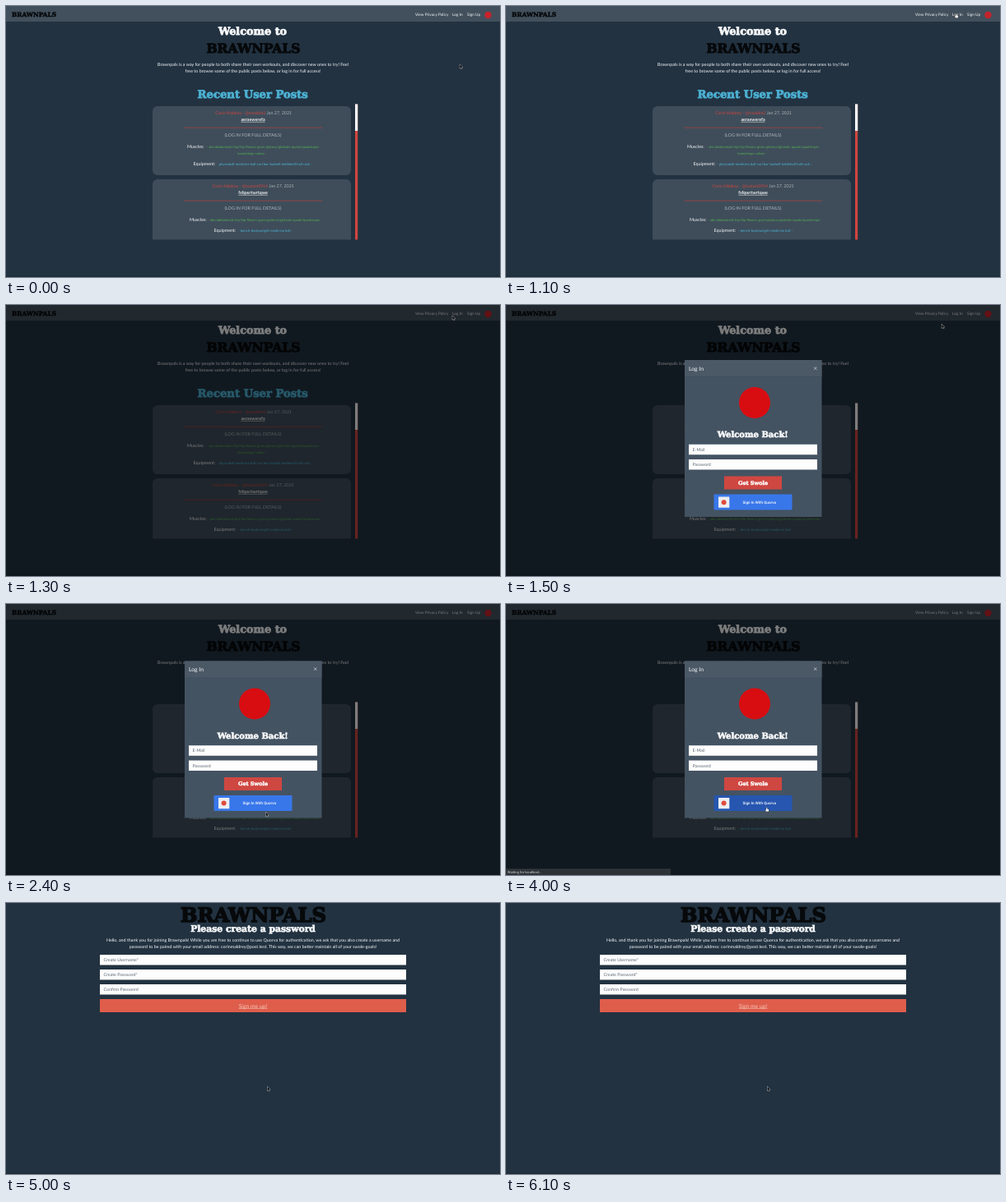
An HTML page with a canvas for the animation above (6300 ms loop, 600x330 px).

```html
<!DOCTYPE html>
<html lang="en">
<head>
<meta charset="utf-8">
<title>Brawnpals sign-in</title>
<style>
html, body { margin: 0; width: 100%; height: 100%; overflow: hidden; background: #223241; }
canvas { display: block; width: 600px; height: 330px; }
</style>
</head>
<body>
<canvas id="stage" width="600" height="330"></canvas>
<script>
const ctx = document.getElementById('stage').getContext('2d');
ctx.textRendering = 'geometricPrecision';

const LOOP = 6300, STEP = 100;
const LATO = 'Lato, sans-serif', ROBOTO = 'Roboto, sans-serif', SLAB = '"DejaVu Serif", serif';
const RED = '#d0453f', WHITE = '#f8f9fa', BG = '#223241', INK = '#07090b';

const clamp01 = v => Math.max(0, Math.min(1, v));
const mix = (a, b, k) => a + (b - a) * k;
const smooth = k => k * k * (3 - 2 * k);

function box(x, y, w, h, color, radius = 0) {
  ctx.fillStyle = color;
  ctx.beginPath();
  ctx.roundRect(x, y, w, h, radius);
  ctx.fill();
}

function disc(x, y, r, color) {
  ctx.fillStyle = color;
  ctx.beginPath();
  ctx.arc(x, y, r, 0, Math.PI * 2);
  ctx.fill();
}

function text(str, x, y, size, color, { align = 'left', weight = 400, font = LATO, underline = false } = {}) {
  ctx.font = `${weight} ${size}px ${font}`;
  ctx.textAlign = align;
  ctx.fillStyle = color;
  ctx.fillText(str, x, y);
  if (underline) {
    const w = ctx.measureText(str).width;
    ctx.fillRect(align === 'center' ? x - w / 2 : x, y + 0.6, w, 0.5);
  }
}

const centered = (str, x, y, size, color, options) =>
  text(str, x, y, size, color, { align: 'center', ...options });

// Heavy slab headings, thickened with a fine outline.
function heading(str, x, y, size, color, align = 'center') {
  text(str, x, y, size, color, { align, weight: 700, font: SLAB });
  ctx.strokeStyle = color;
  ctx.lineWidth = size * 0.06;
  ctx.lineJoin = 'miter';
  ctx.miterLimit = 2;
  ctx.strokeText(str, x, y);
}

function field(x, y, w, label) {
  box(x, y, w, 12.5, '#fdfdfd');
  text(label, x + 4.5, y + 8.1, 5.3, '#5f6a74');
}

function backdropPage() {
  box(0, 0, 600, 330, BG);
  box(0, 328.5, 600, 1.5, '#1e2c39');
}

const posts = [
  {
    y: 122, h: 84, author: 'Corin Maldrey - @cmaldre2', authorEnd: 315.3, title: 'aeraewerefa',
    labelX: 220, muscleX: 243.5, equipX: 227.5, gearX: 256,
    muscles: ['- abs/abdominals-hip/hip flexors-groin-gluteus/gluteals-quads/quadriceps-', 'hamstrings-calves -'],
    gear: '- physioball-medicine ball-curl bar-barbell-kettlebell-half rack -'
  },
  {
    y: 211, h: 84, author: 'Corin Maldrey - @tovlam0914', authorEnd: 318, title: 'fsfqwrtwrtqwe',
    labelX: 223, muscleX: 245, equipX: 252.5, gearX: 282,
    muscles: ['- abs/abdominals-hip/hip flexors-groin-gluteus/gluteals-quads/quadriceps-'],
    gear: '- bench-bodyweight-medicine ball -'
  }
];

function post(p) {
  const y = p.y;
  box(178, y, 241, p.h, '#3f4d5a', 6);
  text(p.author, p.authorEnd, y + 10.3, 5.1, RED, { align: 'right' });
  text('Jan 27, 2021', p.authorEnd + 1.3, y + 10.3, 5.4, '#a8b0b7');
  centered(p.title, 300, y + 18.3, 5.3, WHITE, { weight: 700, underline: true });
  box(216, y + 25.8, 168, 0.6, '#a8423f');
  centered('(LOG IN FOR FULL DETAILS)', 300, y + 37.3, 5.4, '#b0b8bf');
  text('Muscles:', p.labelX, y + 51, 5.4, WHITE);
  text(p.muscles[0], p.muscleX, y + 50.6, 4.22, '#52ae55');
  if (p.muscles[1]) centered(p.muscles[1], 299, y + 58.8, 4.22, '#52ae55');
  const last = y + (p.muscles[1] ? 72.4 : 64.4);
  text('Equipment:', p.equipX, last, 5.4, WHITE);
  text(p.gear, p.gearX, last - 0.3, 4.25, '#4bb2d4');
}

function homePage() {
  backdropPage();
  box(0, 0, 600, 19, '#42505d');
  heading('BRAWNPALS', 7, 13.3, 7.4, INK, 'left');
  text('View Privacy Policy', 497, 11.7, 4.75, WHITE);
  text('Log In', 542, 11.7, 4.75, WHITE);
  text('Sign Up', 560, 11.7, 4.75, WHITE);
  disc(585.5, 11, 4.2, '#c5232b');

  heading('Welcome to', 299.5, 35.2, 12.8, WHITE);
  heading('BRAWNPALS', 300.5, 57, 15.6, INK);
  centered('Brawnpals is a way for people to both share their own workouts, and discover new ones to try! Feel', 300, 72.9, 5.36, WHITE);
  centered('free to browse some of the public posts below, or log in for full access!', 300, 80.9, 5.36, WHITE);
  heading('Recent User Posts', 299.7, 112.3, 13.2, '#4cb1d3');

  ctx.save();
  ctx.beginPath();
  ctx.rect(170, 119.5, 260, 165);
  ctx.clip();
  posts.forEach(post);
  ctx.restore();
  box(424, 119.5, 3.2, 165, RED);
  box(424, 119.5, 3.2, 32.5, '#fbfbfb');
}

function loginDialog(hovered) {
  box(217, 69.5, 166.5, 191, '#445362');
  box(217, 69.5, 166.5, 20.5, '#4b5866');
  box(217, 89.8, 166.5, 0.5, '#3d4a58');
  text('Log In', 222, 82.3, 6.8, WHITE);
  centered('×', 375.6, 82, 8.5, '#c4cad0');
  disc(302, 121.5, 19, '#d80d12');
  heading('Welcome Back!', 299.7, 163.6, 10, WHITE);
  field(222, 172.3, 156, 'E-Mail');
  field(222, 190.4, 156, 'Password');
  box(265, 211, 70, 16, '#cf4741');
  heading('Get Swole', 300, 221.2, 6.5, '#ffffff');
  box(252.5, 233, 95, 19, hovered ? '#2656b0' : '#3877ea', 1);
  box(258, 236, 13.3, 13.3, '#eceef0', 0.5);
  disc(264.6, 242.6, 3, '#df4b3c');
  centered('Sign In With Quorva', 307.7, 244.1, 4.6, '#ffffff', { weight: 500, font: ROBOTO });
}

function passwordPage() {
  backdropPage();
  heading('BRAWNPALS', 300.5, 22.6, 24.2, INK);
  heading('Please create a password', 300, 35, 10.8, WHITE);
  centered('Hello, and thank you for joining Brawnpals! While you are free to continue to use Quorva for authentication, we ask that you also create a username and', 300, 46.9, 5.36, WHITE);
  centered('password to be paired with your email address: corinmaldrey@post.test. This way, we can better maintain all of your swole-goals!', 300, 55.1, 5.36, WHITE);
  field(114, 63, 372, 'Create Username*');
  field(114, 81, 372, 'Create Password*');
  field(114, 99, 372, 'Confirm Password');
  box(114, 117, 372, 16, '#df5d4b');
  centered('Sign me up!', 300, 127.9, 6.8, '#f3c8b8', { underline: true });
}

function statusBar() {
  box(0, 322.8, 200, 7.2, '#2d3237');
  box(0, 322.8, 200, 0.5, '#41474d');
  text('Waiting for localhost…', 1.8, 327.9, 4.2, '#d6d8da', { font: ROBOTO });
}

// Pointer stops: time, x, y of the tip.
const stops = [
  [0, 551.3, 71], [100, 551.3, 71], [700, 546.8, 9.4], [1200, 546.8, 9.4],
  [1500, 529.3, 23.2], [2100, 330, 238], [2400, 315.6, 253.5], [2700, 316.8, 247.8],
  [4300, 316.8, 247.8], [4800, 317.5, 223.5], [LOOP, 317.5, 223.5]
];

function pointerAt(t) {
  const i = Math.max(1, stops.findIndex(s => s[0] > t));
  const [t0, x0, y0] = stops[i - 1], [t1, x1, y1] = stops[i];
  const k = smooth((t - t0) / (t1 - t0));
  return [mix(x0, x1, k), mix(y0, y1, k)];
}

function pointer(x, y, hand) {
  ctx.save();
  ctx.translate(x, y);
  ctx.lineJoin = 'round';
  ctx.beginPath();
  if (hand) {
    ctx.roundRect(-0.6, 0, 1.2, 4, 0.5);
    ctx.roundRect(-1.4, 2, 3.8, 3, 0.8);
    ctx.fillStyle = '#f4f4f4';
    ctx.strokeStyle = '#16191c';
  } else {
    [[0, 0], [0, 5], [1.1, 4.1], [1.9, 5.6], [2.6, 5.2], [1.9, 3.7], [3.3, 3.6]]
      .forEach(([px, py]) => ctx.lineTo(px, py));
    ctx.closePath();
    ctx.fillStyle = '#101214';
    ctx.strokeStyle = '#e4e6e8';
  }
  ctx.lineWidth = 0.7;
  ctx.stroke();
  ctx.fill();
  ctx.restore();
}

function draw(t) {
  const overButton = t >= 2600;
  if (t < 4100) {
    homePage();
    const shade = 0.5 * clamp01((t - 1125) / 150);
    if (shade) box(0, 0, 600, 330, `rgba(0,0,0,${shade})`);
    const slide = clamp01((t - 1300) / 300);
    if (slide) {
      ctx.save();
      ctx.globalAlpha = clamp01((t - 1300) / 150);
      ctx.translate(0, -15 * Math.pow(1 - slide, 1.65));
      loginDialog(overButton);
      ctx.restore();
    }
  } else {
    passwordPage();
  }
  if (t >= 3200 && t < 4600) statusBar();
  const hand = (t >= 700 && t < 1300) || (overButton && t < 4400);
  pointer(...pointerAt(t), hand);
}

const start = performance.now();
function tick() {
  const t = (performance.now() - start) % LOOP;
  draw(Math.floor(t / STEP) * STEP);
  requestAnimationFrame(tick);
}
tick();
</script>
</body>
</html>
```
